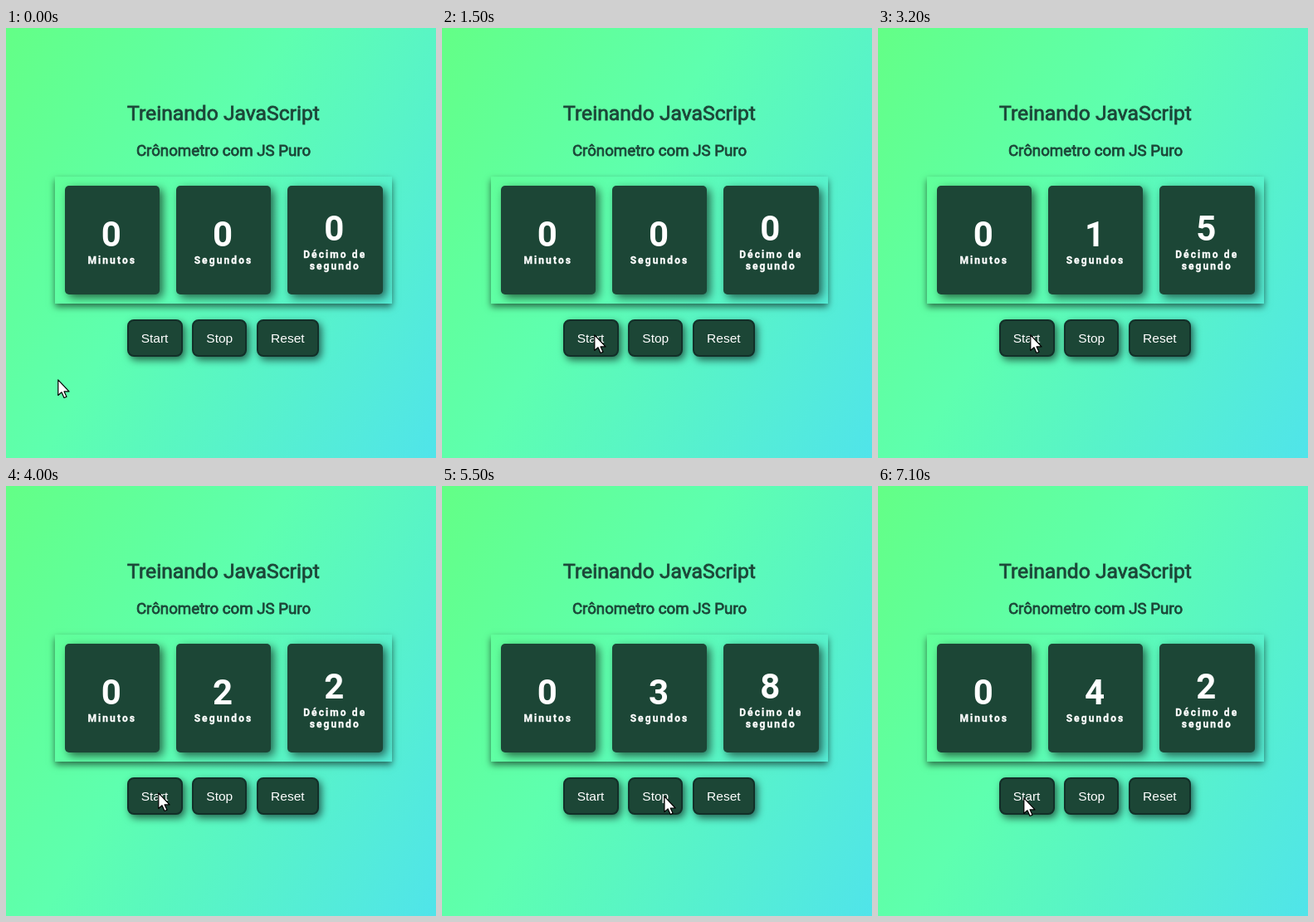
Animation of 518 by 518 pixels, one loop 8 s. Source, as an HTML page:

```html
<!DOCTYPE html>
<html lang="pt-BR">
<head>
<meta charset="utf-8">
<title>Cronômetro</title>
<style>
  html, body { margin: 0; width: 100%; height: 100%; overflow: hidden; }
  body {
    position: relative;
    background: linear-gradient(120deg, #63ff86 0%, #5effaf 42%, #50e4ea 100%);
    font-family: Roboto, sans-serif;
    text-align: center;
  }
  h1, h2 {
    position: absolute; left: 0; width: 524px; margin: 0;
    font-weight: 400; line-height: 30px;
    color: #1c4638; -webkit-text-stroke: .8px #1c4638;
  }
  h1 { top: 88px; font-size: 24.7px; }
  h2 { top: 133px; font-size: 18.7px; }
  .panel, .buttons { position: absolute; display: flex; box-sizing: border-box; }
  .panel {
    left: 59px; top: 178.5px; width: 406px; height: 153.5px;
    padding: 11.3px 11.5px; gap: 19.75px;
    box-shadow: 0 4px 8px rgba(0, 0, 0, .55);
  }
  .card {
    flex: 1 1 0; display: flex; flex-direction: column; justify-content: center;
    border-radius: 5px; background: #1c4636; color: #fff;
    font-weight: 700; letter-spacing: 2.1px;
    box-shadow: 4px 4px 11px rgba(0, 0, 0, .6);
  }
  .card b { font-size: 42px; line-height: 49px; }
  .card span { font-size: 12px; line-height: 14px; -webkit-text-stroke: .35px #fff; }
  .buttons { left: 145.5px; top: 351px; gap: 11.5px; }
  .buttons div {
    padding: 0 15.2px; border: 2.5px solid #122f28; border-radius: 8px;
    background: #1c4636; color: #fff;
    font: 15.5px/41px "Liberation Sans", Arial, sans-serif;
    box-shadow: 3px 4px 10px rgba(0, 0, 0, .6);
  }
  svg { position: absolute; left: 0; top: 0; }
</style>
</head>
<body>
<h1>Treinando JavaScript</h1>
<h2>Crônometro com JS Puro</h2>

<div class="panel">
  <div class="card"><b>0</b><span>Minutos</span></div>
  <div class="card"><b id="seconds">0</b><span>Segundos</span></div>
  <div class="card"><b id="tenths">0</b><span>Décimo de<br>segundo</span></div>
</div>
<div class="buttons"><div>Start</div><div>Stop</div><div>Reset</div></div>

<svg width="518" height="518">
  <path id="cursor" d="M.8 .8V19.5L5 15.8L8 22.5L11 21.2L8.1 14.9H14Z"
        fill="#fff" stroke="#000" stroke-width="1.2" stroke-linejoin="round"/>
</svg>

<script>
  const LOOP = 8000, STEP = 100, LAST = 42;
  const [seconds, tenths, cursor] =
    ['seconds', 'tenths', 'cursor'].map(id => document.getElementById(id));

  const clamp = (v, lo, hi) => Math.min(hi, Math.max(lo, v));
  const smooth = p => p * p * (3 - 2 * p);
  const easeOut = p => 1 - (1 - p) ** 3;

  const home = { x: 62, y: 423 };
  const moves = [
    { from: 300, to: 1450, x: 183, y: 369, dip: 0, ease: smooth },
    { from: 4780, to: 5700, x: 268, y: 373, dip: 4, ease: easeOut },
    { from: 6400, to: 7100, x: 175, y: 375, dip: 10, ease: smooth }
  ];

  // Each move starts where the one before ended and sags by its dip.
  function pointer(t) {
    return moves.reduce((at, m) => {
      const p = m.ease(clamp((t - m.from) / (m.to - m.from), 0, 1));
      return {
        x: at.x + (m.x - at.x) * p,
        y: at.y + (m.y - at.y) * p + m.dip * Math.sin(Math.PI * p)
      };
    }, home);
  }

  // Tenths since the start click, with a slow drift in the ticking.
  function elapsed(t) {
    const drift = 60 * Math.sin(t / 850);
    return clamp(Math.floor((t - 1650 + drift) / 100), 0, LAST);
  }

  function draw() {
    const t = Math.floor(performance.now() % LOOP / STEP) * STEP;
    const count = elapsed(t), { x, y } = pointer(t);
    seconds.textContent = Math.floor(count / 10);
    tenths.textContent = count % 10;
    cursor.setAttribute('transform', `translate(${x} ${y})`);
    requestAnimationFrame(draw);
  }
  draw();
</script>
</body>
</html>
```
